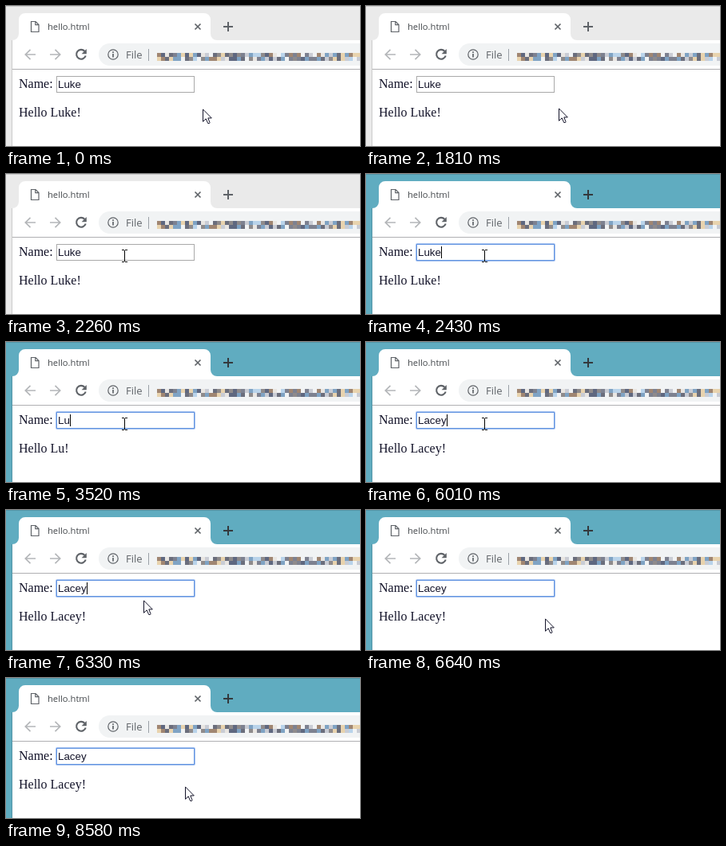
Animation of 443 by 176 pixels, one loop 9.13 s. Source, as an HTML page:

```html
<!DOCTYPE html>
<html lang="en">
<head>
<meta charset="utf-8">
<title>hello.html</title>
<style>
  html, body { margin: 0; width: 100%; height: 100%; overflow: hidden; }
  svg { display: block; width: 443px; height: 176px; }
  .ui { font-family: "Open Sans", "Noto Sans", sans-serif; fill: #5f6368; }
  .tab { fill: #45494d; }
  .page { font: 16px "Liberation Serif", Times, serif; fill: #14142a; }
  .field { font: 13.333px "Liberation Sans", Arial, sans-serif; fill: #14142a; }
  .line { fill: none; stroke: #5f6368; stroke-width: 1.7; }
  .thin { stroke-width: 1.2; }
  .bold { stroke-width: 2.1; }
  .dim { stroke: #b4b6b9; }
  .crisp { shape-rendering: crispEdges; }
  #frame { fill: #eaeaea; }
  #plus { stroke: #5f6368; stroke-width: 2; }
  #ring { fill: none; display: none; }
  .focused #frame { fill: #60acc0; }
  .focused #plus { stroke: #34393d; }
  .focused #ring { display: inline; }
</style>
</head>
<body>
<svg id="stage" viewBox="0 0 443 176">
  <rect id="frame" width="443" height="176"/>
  <path fill="none" stroke="#000" stroke-opacity=".13" d="M0 .5 H443 M7.5 43 V176"/>

  <!-- tab and toolbar -->
  <path fill="#fff" d="M8 43 A8 8 0 0 0 16 35 V17 A8 8 0 0 1 24 9 H248 A8 8 0 0 1 256 17 V35 A8 8 0 0 0 264 43 H443 V176 H8 Z"/>
  <path class="line thin" d="M31.5 19.5 H37 L41 23.5 V32.5 H31.5 Z M36.8 19.5 V23.7 H41"/>
  <text class="ui tab" x="52" y="30" font-size="11.2">hello.html</text>
  <path class="line" d="M236.5 22.5 l7 7 m0 -7 l-7 7"/>
  <path id="plus" d="M272 26 h12 M278 20 v12"/>

  <path class="line dim" d="M37 61 H24.5 M30.5 54.8 L24.3 61 L30.5 67.2"/>
  <path class="line dim" d="M55 61 H67.5 M61.5 54.8 L67.7 61 L61.5 67.2"/>
  <path class="line bold" d="M98.4 56.8 A5.9 5.9 0 1 0 99.7 62.5"/>
  <path fill="#5f6368" d="M100.8 54 V60.2 H94.6 Z"/>

  <path fill="#f1f3f4" d="M443 47 H130 a14 14 0 0 0 0 28 H443 Z"/>
  <circle class="line thin" cx="134" cy="61" r="6.2"/>
  <path class="line" d="M134 60 v4.5 M134 57.3 v1.6"/>
  <text class="ui" x="150" y="66" font-size="13">File</text>
  <path stroke="#9aa0a6" d="M178.5 54 v15"/>
  <g id="mosaic" class="crisp"></g>
  <path stroke="#b0b0b2" d="M8 79.5 H443"/>

  <!-- page -->
  <text class="page" x="16" y="103">Name:</text>
  <rect x="63.5" y="88.5" width="172" height="20" fill="#fff" stroke="#a9a9a9"/>
  <g id="ring">
    <rect x="62.5" y="87.5" width="174" height="22" rx="1" stroke="#a3c0f0"/>
    <rect x="63.5" y="88.5" width="172" height="20" stroke="#6394e0"/>
  </g>
  <text id="entry" class="field" x="65" y="103"></text>
  <rect id="caret" y="91" width="1" height="15"/>
  <text id="greeting" class="page" x="16" y="139"></text>

  <!-- pointers, hot spot at 0,0 -->
  <path id="arrow" fill="#fff" stroke="#14142a" d="M.5 .9 V16.3 L4.2 12.8 L6.7 18.5 H8.5 L9 17.5 L6.8 11.9 H11.3 Z"/>
  <path id="beam" class="crisp" fill="none" stroke="#000" d="M-3 -7.5 H0 M1 -7.5 H4 M.5 -7 V7 M-3 7.5 H0 M1 7.5 H4"/>
</svg>
<script>
const LOOP = 9130;
const FOCUS = 2430;
const $ = id => document.getElementById(id);

// [start time, text]
const typed = [
  [0, 'Luke'], [3290, 'Luk'], [3445, 'Lu'], [3690, 'L'], [4000, 'La'],
  [4460, 'Lac'], [4610, 'Lace'], [4920, 'Lacey']
];
const greeted = [
  [0, 'Luke'], [3365, 'Luk'], [3520, 'Lu'], [3690, 'L'], [4075, 'La'],
  [4460, 'Lac'], [4610, 'Lace'], [4920, 'Lacey']
];
const caretOn = [[2430, 2980], [3290, 5450], [6010, 6560], [7040, 7590], [8120, 8580]];
const moves = [
  { start: 1810, end: 2260, steps: 7, from: [246, 129], to: [148, 103] },
  { start: 6110, end: 6640, steps: 8, from: [148, 103], to: [224, 136] }
];

const at = (table, t) => table.filter(([start]) => start <= t).pop()[1];
const smooth = p => p * p * (3 - 2 * p);

function pointerAt(t) {
  const { start, end, steps, from, to } = moves.filter(m => t >= m.start).pop()
    || { ...moves[0], to: moves[0].from };
  const gap = (end - start) / (steps - 1);
  const step = Math.min(steps, Math.floor((t - start) / gap + 1.001));
  const p = smooth(Math.max(0, step) / steps);
  return from.map((v, i) => Math.round(v + (to[i] - v) * p));
}

function buildMosaic() {
  const dark = ['#6b6e7c', '#7d8190', '#5f6880', '#8f8b8c', '#a08672', '#7fa3c4'];
  const light = ['#e9e6e2', '#e8d3ae', '#b9d3ea', '#c9ccd4', '#f1f3f4'];
  const size = 5;
  let seed = 29;
  const random = () => (seed = seed * 16807 % 2147483647) / 2147483647;
  const pick = list => list[Math.floor(random() * list.length)];
  let cells = '';
  for (let x = 189; x < 443; x += size)
    for (let row = 0; row < 2; row++) {
      const color = pick(random() < 0.5 ? dark : light);
      cells += `<rect x="${x}" y="${59 + row * size}" width="${size}" height="${size}" fill="${color}"/>`;
    }
  $('mosaic').innerHTML = cells;
}

function draw(t) {
  $('stage').classList.toggle('focused', t >= FOCUS);
  $('entry').textContent = at(typed, t);
  $('greeting').textContent = `Hello ${at(greeted, t)}!`;

  const blink = caretOn.some(([on, off]) => t >= on && t < off);
  $('caret').setAttribute('visibility', blink ? 'visible' : 'hidden');
  $('caret').setAttribute('x', Math.round(65 + $('entry').getComputedTextLength()));

  const [x, y] = pointerAt(t);
  const overField = x >= 63 && x < 236 && y >= 88 && y < 109;
  for (const [id, shown] of [['arrow', !overField], ['beam', overField]]) {
    $(id).setAttribute('visibility', shown ? 'visible' : 'hidden');
    $(id).setAttribute('transform', `translate(${x} ${y})`);
  }
}

buildMosaic();
const begin = performance.now();
function tick() {
  draw((performance.now() - begin) % LOOP);
  requestAnimationFrame(tick);
}
tick();
</script>
</body>
</html>
```
